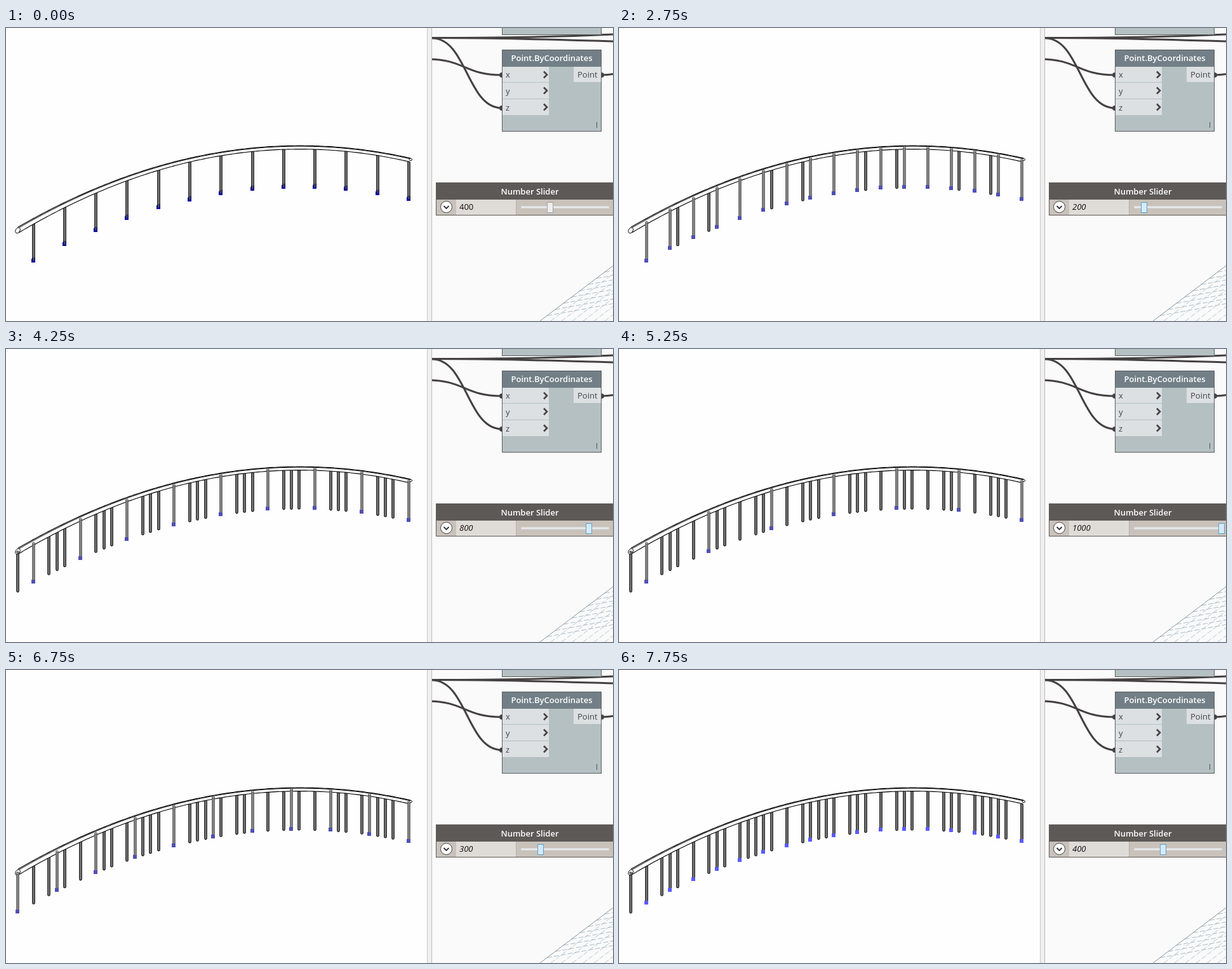
Recreate the animation shown at these times as an HTML page with a canvas. Size 956 by 461 pixels, loop 8000 ms.

```html
<!DOCTYPE html>
<html lang="en">
<head>
<meta charset="utf-8">
<title>Railing spacing</title>
<style>
  html, body { margin: 0; width: 100%; height: 100%; overflow: hidden; background: #fefefe; }
  canvas { display: block; }
</style>
</head>
<body>
<canvas id="stage" width="956" height="461"></canvas>
<script>
const ctx = document.getElementById('stage').getContext('2d');
const LOOP = 8000;
const FONT = '"Open Sans", sans-serif';
const WIRE = '#454142';

// start time, slider value, spacing of the posts (one step behind the slider)
const STEPS = [
  [0, 400, 400], [2000, 300, 400], [2750, 200, 300], [3750, 600, 200],
  [4250, 800, 600], [5250, 1000, 800], [6250, 500, 1000], [6750, 300, 500],
  [7500, 400, 300]
];

const arc = (top, bend) => x => top + bend * (x - 463) ** 2;
const railTop = arc(185.2, 0.00065);
const railInner = arc(186.1, 0.000655);
const railBottom = arc(190.6, 0.00067);
const ground = arc(249.8, 0.00066);
const postX = d => Math.floor(634.3 - d * 0.12315) + 0.5;

function box(x, y, w, h, fill) {
  ctx.fillStyle = fill;
  ctx.fillRect(x, y, w, h);
}

function frame(x, y, w, h, color) {
  ctx.strokeStyle = color;
  ctx.lineWidth = 1;
  ctx.strokeRect(x + 0.5, y + 0.5, w - 1, h - 1);
}

function line(path, color, width) {
  ctx.strokeStyle = color;
  ctx.lineWidth = width;
  ctx.stroke(new Path2D(path));
}

function text(str, x, y, color, style = '', align = 'left') {
  ctx.font = `${style} 13px ${FONT}`;
  ctx.textAlign = align;
  ctx.fillStyle = color;
  ctx.fillText(str, x, y);
}

function disc(x, y, r, fill) {
  ctx.fillStyle = fill;
  ctx.beginPath();
  ctx.arc(x, y, r, 0, 7);
  ctx.fill();
}

function ellipse(x, y, rx, ry, turn, fill, stroke) {
  ctx.beginPath();
  ctx.ellipse(x, y, rx, ry, turn, 0, 7);
  ctx.fillStyle = fill;
  ctx.fill();
  ctx.strokeStyle = stroke;
  ctx.lineWidth = 1;
  ctx.stroke();
}

function distances(spacing) {
  const list = [];
  for (let d = 0; d <= 5000; d += spacing) list.push(d);
  return list;
}

function post(x, y0, y1, edge, core, cap) {
  ctx.lineCap = cap;
  line(`M${x} ${y0}V${y1}`, edge, 4.6);
  line(`M${x} ${y0}V${y1}`, core, 2.4);
  ctx.lineCap = 'butt';
}

function trace(f, from, to) {
  const step = Math.sign(to - from) * 4;
  for (let x = from; (to - x) * step > 0; x += step) ctx.lineTo(x, f(x));
  ctx.lineTo(to, f(to));
}

function curve(f, from, to, width) {
  ctx.beginPath();
  trace(f, from, to);
  ctx.strokeStyle = '#000';
  ctx.lineWidth = width;
  ctx.stroke();
}

function rail() {
  ctx.beginPath();
  trace(railTop, 19, 638);
  trace(railBottom, 638, 20);
  ctx.closePath();
  ctx.fillStyle = '#fefefe';
  ctx.fill();
  curve(railTop, 19, 637, 1.2);
  curve(railInner, 21, 637, 0.9);
  curve(railBottom, 20, 636, 1.1);
  ellipse(637.3, 207, 2.3, 1.7, 0.2, '#fefefe', '#000');
  ellipse(18.5, 318.4, 3.3, 4.8, 0.5, '#fefefe', '#000');
}

function railing(t, index) {
  const active = distances(STEPS[index][2]);
  const placed = new Set(STEPS.slice(0, index + 1).flatMap(s => distances(s[2])));
  const fresh = t >= 2750 && t < 7750;
  const square = t < 2750 ? '#0a0aa0' : fresh ? '#5050b4' : '#5a5aff';

  for (const d of placed) {
    if (fresh && active.includes(d)) continue;
    const x = postX(d);
    const end = ground(x) + (active.includes(d) ? -2 : 0.5);
    post(x, railBottom(x) - 1, end, '#000', '#808080', 'round');
  }
  rail();
  if (placed.has(5000)) ellipse(18.5, 319.5, 1.8, 1.6, 0, '#999', '#111');

  for (const d of active) {
    const x = postX(d), y = ground(x);
    if (fresh) {
      post(x, railBottom(x) - 3, y - 2, '#505050', '#8a8a8a', 'butt');
      ellipse(x, railBottom(x) - 3, 1.8, 1.4, 0, '#c8c8c8', '#555');
    }
    box(x - 3.5, Math.round(y - 3), 6, 6, square);
    if (t < 2750) post(x, y - 5, y, '#00003c', '#50507a', 'butt');
  }
}

function grid() {
  ctx.save();
  ctx.beginPath();
  ctx.moveTo(841, 461);
  ctx.lineTo(956, 374);
  ctx.lineTo(956, 461);
  ctx.clip();
  ctx.setLineDash([8, 3]);
  for (let i = 1; i < 8; i++) {
    line(`M${841 + 17 * i} 461l115 -87`, '#b4c5d0', 1);
  }
  for (let i = 0; i < 9; i++) {
    const x = 852 + 13 * i, y = 452.7 - 9.8 * i;
    line(`M${x} ${y}l120 -22`, '#a9bcc8', 1);
  }
  ctx.setLineDash([]);
  ctx.restore();
  line('M841 461L956 374', '#8796a0', 1);
}

function wires() {
  line('M671 16C726 16 726 126 781 126', WIRE, 3);
  line('M664 49C722 49 722 74 781 74', WIRE, 3);
  line('M671 15.5C760 15.5 860 14.5 956 10', WIRE, 3);
  line('M671 15.5C760 15.5 860 18 956 21', WIRE, 3);
  line('M938 74Q948 74 956 72.5', WIRE, 3);
  for (const [x, y] of [[781, 74], [781, 126], [938, 74]]) disc(x, y, 4, WIRE);
}

function pointNode() {
  box(781, 0, 157, 11, '#b5c0c2');
  frame(781, -5, 157, 16, '#5a5e60');
  box(781, 34, 157, 129, '#b5c0c2');
  box(781, 34, 157, 27, '#727f87');
  text('Point.ByCoordinates', 859.5, 52, '#fff', '600', 'center');
  ['x', 'y', 'z'].forEach((name, i) => {
    const y = Math.floor(61 + i * 25.5);
    box(782, y, 73, 25, '#dce0e2');
    if (i) box(782, y - 1, 73, 1, '#b5c0c2');
    text(name, 787, 78 + i * 26, '#444');
    line(`M847 ${y + 7.5}l5 5l-5 5`, '#444', 2.6);
  });
  box(894, 61, 43, 24, '#dce0e2');
  text('Point', 900, 78, '#444');
  box(930, 148, 1, 9, '#4c5355');
  frame(781, 34, 157, 129, '#5a5e60');
}

function thumb(t, value) {
  const [fill, edge] = t < 750 ? ['#efeeee', '#a5a29f']
    : t < 1250 ? ['#dcecfc', '#7eb4ea'] : ['#d5eafa', '#5d9fcb'];
  const x = Math.round(796 + 0.1525 * value) - 5;
  box(x, 274, 10, 17, fill);
  frame(x, 274, 10, 17, edge);
}

function sliderNode(t, value) {
  box(677, 243, 290, 52, '#c9c2bb');
  box(677, 243, 290, 27, '#5d5957');
  text('Number Slider', 825, 262, '#fff', '600', 'center');
  box(709, 270, 94, 24, '#dfdbd7');
  box(803, 270, 1, 24, '#b8b1aa');
  ellipse(693.5, 281.5, 9, 9, 0, '#fff', '#444');
  line('M689.5 280l4 4l4 -4', '#333', 1.8);
  text(value, 714, 286, '#111', t < 2000 ? '' : 'italic');
  box(811, 280, 139, 4, '#e7eaea');
  frame(811, 280, 139, 4, '#d9d8d6');
  thumb(t, value);
  frame(677, 243, 290, 52, '#5d5957');
}

function panel(t, value) {
  box(671, 0, 285, 461, '#fafafa');
  grid();
  wires();
  pointNode();
  sliderNode(t, value);
}

function divider() {
  box(663, 0, 8, 461, '#f0f0f0');
  box(663, 0, 1, 461, '#c8c8c8');
  box(670, 0, 1, 461, '#bcbcbc');
}

function draw(t) {
  const index = STEPS.findLastIndex(s => s[0] <= t);
  box(0, 0, 956, 461, '#fefefe');
  panel(t, STEPS[index][1]);
  divider();
  railing(t, index);
}

const start = performance.now();
function tick() {
  draw((performance.now() - start) % LOOP);
  requestAnimationFrame(tick);
}
tick();
</script>
</body>
</html>
```
